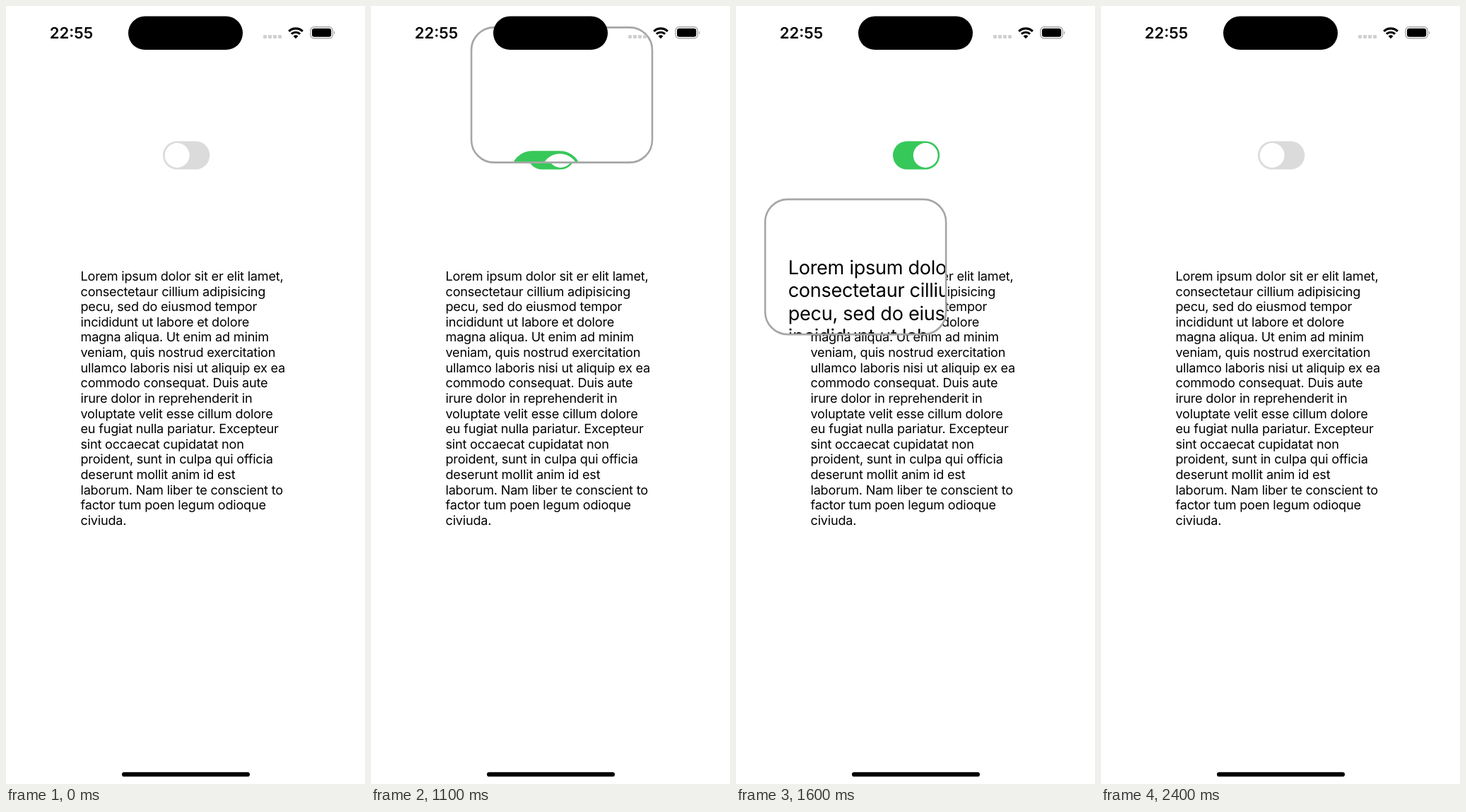
An HTML page that plays this animation: 508 px wide and 1102 px high, repeating every 2.5 s.

```html
<!DOCTYPE html>
<html lang="en">
<head>
<meta charset="utf-8">
<title>Magnifier</title>
<style>
html, body { margin: 0; width: 100%; height: 100%; overflow: hidden; background: #fff; }
svg { display: block; width: 508px; height: 1102px; }
text { font-family: Inter, sans-serif; text-rendering: geometricPrecision; }
#copy { font-size: 18.1px; letter-spacing: -0.21px; }
#clock { font-size: 22px; font-weight: 600; text-anchor: middle; }
</style>
</head>
<body>
<svg viewBox="0 0 508 1102">
  <defs>
    <clipPath id="lens"><rect class="frame" rx="32"/></clipPath>
  </defs>

  <g id="page">
    <rect id="track" x="222" y="191.5" width="66.2" height="40" rx="20"/>
    <circle id="thumb" cy="211.5" r="17.4" fill="#fff"/>
    <text id="copy"></text>
  </g>

  <g id="loupe">
    <g clip-path="url(#lens)">
      <rect width="508" height="1102" fill="#fff"/>
      <use id="zoomed" href="#page"/>
    </g>
    <rect class="frame" rx="32" fill="none" stroke="#a6a6a6" stroke-width="2.6"/>
  </g>

  <g id="status">
    <text id="clock" x="92.5" y="46">22:55</text>
    <rect x="173" y="14.5" width="162" height="47.6" rx="23.8"/>
    <g fill="#d0d0d0">
      <rect x="364" y="41" width="5" height="5" rx="1.3"/>
      <rect x="371" y="41" width="5" height="5" rx="1.3"/>
      <rect x="378" y="41" width="5" height="5" rx="1.3"/>
      <rect x="385" y="41" width="5" height="5" rx="1.3"/>
    </g>
    <g transform="translate(410 46.2)">
      <path d="M0 0L-3.4 -3.5A4.9 4.9 0 0 1 3.4 -3.5Z"/>
      <path d="M-6.1 -6.5A8.9 8.9 0 0 1 6.1 -6.5M-9.8 -10.4A14.3 14.3 0 0 1 9.8 -10.4"
            fill="none" stroke="#000" stroke-width="3.1"/>
    </g>
    <rect x="430.9" y="29.7" width="31.4" height="16.2" rx="5" fill="none" stroke="#999" stroke-width="1.2"/>
    <rect x="433" y="31.8" width="27.2" height="12" rx="3.2"/>
    <path d="M464 35.2Q466.4 37.7 464 40.6Z" fill="#999"/>
    <rect x="164" y="1085.2" width="181" height="6.3" rx="3.1"/>
  </g>
</svg>

<script>
const LOOP = 2500, STEP = 100;
const LENS = { width: 258.5, height: 193.9, zoom: 1.5, lift: 19, border: 2.6 };

const lines = `Lorem ipsum dolor sit er elit lamet,
consectetaur cillium adipisicing
pecu, sed do eiusmod tempor
incididunt ut labore et dolore
magna aliqua. Ut enim ad minim
veniam, quis nostrud exercitation
ullamco laboris nisi ut aliquip ex ea
commodo consequat. Duis aute
irure dolor in reprehenderit in
voluptate velit esse cillum dolore
eu fugiat nulla pariatur. Excepteur
sint occaecat cupidatat non
proident, sunt in culpa qui officia
deserunt mollit anim id est
laborum. Nam liber te conscient to
factor tum poen legum odioque
civiuda.`.split("\n");

// Drag path of the loupe centre: [ms, x, y]
const path = [
  [500, 240, 150], [600, 233.5, 130.5], [700, 129, 380], [800, 331, 637],
  [900, 204, 688.5], [1000, 165, 440], [1100, 270, 126], [1200, 374, 190],
  [1300, 324, 312.8], [1400, 374, 400], [1500, 240, 132], [1600, 169.2, 369.5],
  [1700, 130, 560], [1800, 201.5, 711], [1900, 310, 766], [2000, 331, 600],
  [2100, 204, 772], [2200, 129, 400], [2300, 233.5, 130.5]
];

const $ = id => document.getElementById(id);
const clamp = v => Math.min(1, Math.max(0, v));
const mix = (a, b, u) => a + (b - a) * u;

const set = (el, attrs) => {
  for (const name in attrs) el.setAttribute(name, attrs[name]);
};

lines.forEach((line, i) => {
  const span = document.createElementNS("http://www.w3.org/2000/svg", "tspan");
  set(span, { x: 105.5, y: 389 + i * 21.62 });
  span.textContent = line;
  $("copy").append(span);
});

function centreAt(t) {
  const next = Math.max(1, path.findIndex(p => p[0] >= t));
  const [t0, x0, y0] = path[next - 1], [t1, x1, y1] = path[next];
  const u = clamp((t - t0) / (t1 - t0));
  return [mix(x0, x1, u), mix(y0, y1, u)];
}

function drawToggle(t) {
  const on = clamp((t - 200) / 200) * clamp((2400 - t) / 200);
  const channels = [[219, 55], [219, 200], [219, 90]].map(([a, b]) => mix(a, b, on));
  set($("track"), { fill: `rgb(${channels})` });
  set($("thumb"), { cx: mix(242.2, 268.2, on) });
}

function drawLoupe(t) {
  const visible = t >= 500 && t < 2400;
  $("loupe").style.display = visible ? "" : "none";
  if (!visible) return;

  const [x, y] = centreAt(t);
  const size = clamp(Math.min(t - 372, 2528 - t) / 328);
  const sx = size, sy = mix(1, size, 0.9);
  const w = LENS.width * sx - LENS.border, h = LENS.height * sy - LENS.border;
  document.querySelectorAll(".frame").forEach(el =>
    set(el, { x: x - w / 2, y: y - h / 2, width: w, height: h }));

  const kx = LENS.zoom * sx, ky = LENS.zoom * sy;
  const dx = x * (1 - kx), dy = y * (1 - ky) - LENS.lift * sy;
  set($("zoomed"), { transform: `matrix(${kx} 0 0 ${ky} ${dx} ${dy})` });
}

const start = performance.now();

function render() {
  const elapsed = (performance.now() - start) % LOOP;
  const t = Math.floor(elapsed / STEP) * STEP;
  drawToggle(t);
  drawLoupe(t);
  requestAnimationFrame(render);
}
render();
</script>
</body>
</html>
```
